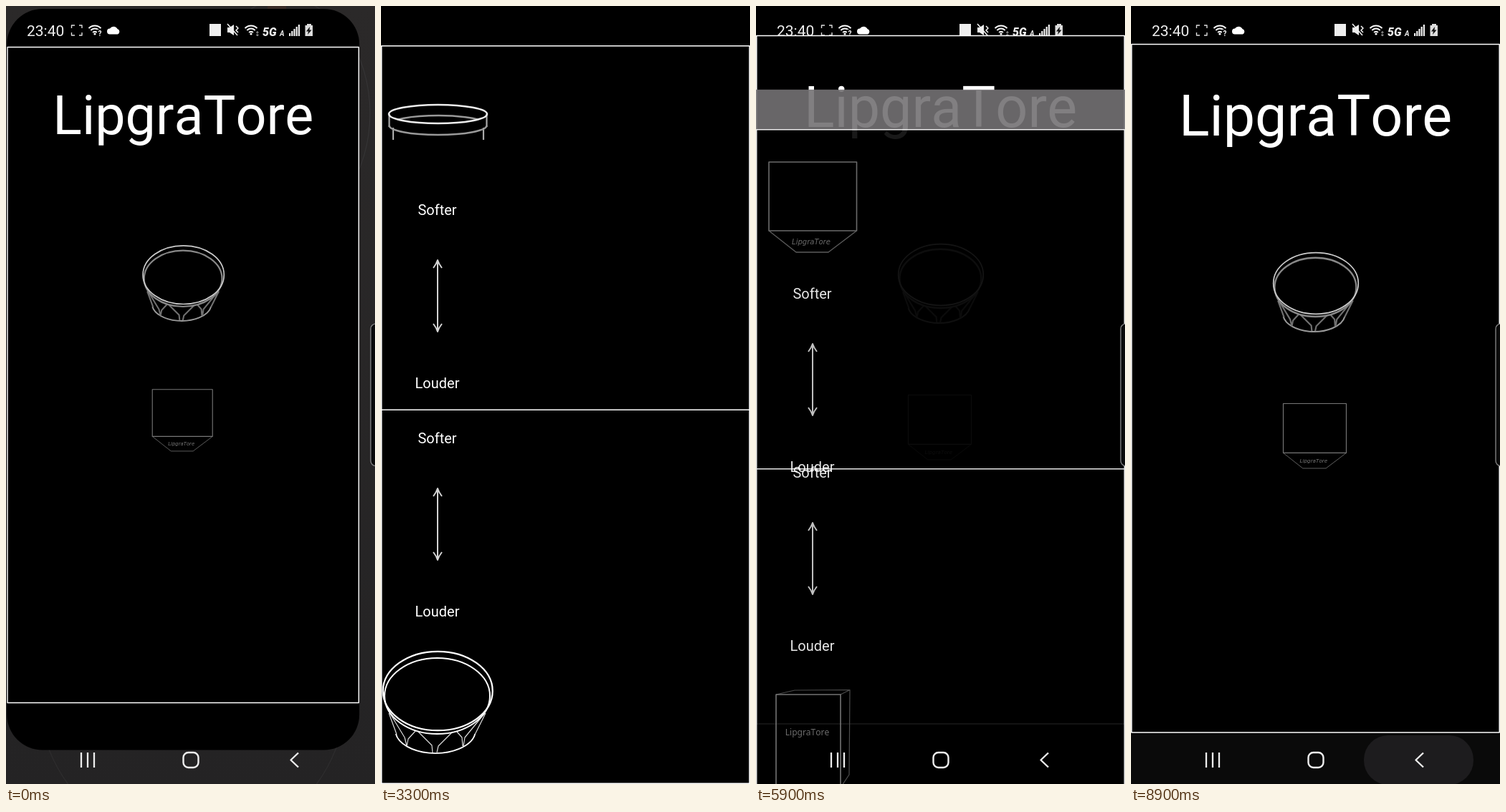
An HTML page with a canvas that plays this animation: 515x1087 px, repeating every 9000 ms.

```html
<!DOCTYPE html>
<html lang="en">
<head>
<meta charset="utf-8">
<title>LipgraTore</title>
<style>
html, body { margin: 0; height: 100%; overflow: hidden; background: #000; }
canvas { display: block; }
</style>
</head>
<body>
<canvas id="stage" width="515" height="1087"></canvas>
<script>
const W = 515, H = 1087, LOOP = 9000, STEP = 100;
const NAME = 'LipgraTore';
const c = document.getElementById('stage').getContext('2d');
c.lineJoin = 'round';
c.fontKerning = 'none';

function stroke(path, color = '#fff', width = 1.5) {
  c.strokeStyle = color;
  c.lineWidth = width;
  c.stroke(new Path2D(path));
}
function fill(path, color = '#fff') {
  c.fillStyle = color;
  c.fill(new Path2D(path));
}
function rect(x, y, w, h, color) {
  c.fillStyle = color;
  c.fillRect(x, y, w, h);
}
function oval(x, y, rx, ry, color, width, from = 0, to = 2) {
  c.beginPath();
  c.ellipse(x, y, rx, ry, 0, from * Math.PI, to * Math.PI);
  c.strokeStyle = color;
  c.lineWidth = width;
  c.stroke();
}
function pill(x, y, w, h, r) {
  c.beginPath();
  c.roundRect(x, y, w, h, r);
}
function text(s, x, y, font, color = '#fff', align = 'center') {
  c.font = font;
  c.textAlign = align;
  c.fillStyle = color;
  c.fillText(s, x, y);
}
// Draws with the point (ax, ay) of the artwork moved to (x, y) and scaled there.
function place(x, y, sx, sy, ax, ay, draw) {
  c.save();
  c.translate(x, y);
  c.scale(sx, sy);
  c.translate(-ax, -ay);
  draw();
  c.restore();
}
const soften = hit => { c.filter = hit ? 'none' : 'blur(0.6px)'; };

// Instruments, in the coordinates of the playing page
function drum(hit) {
  soften(hit);
  const rib = hit ? '#ddd' : '#707070', w = hit ? 1.2 : 2.8;
  oval(76, 1012, 56, 32, hit ? '#fff' : '#999', hit ? 1.8 : 2.6, 0.05, 0.95);
  stroke('M11 988L22 1018M146 988L131 1018M13 989L33 1022L36 1034M48 1013L38 1024L36 1034' +
    'M52 1014L71 1033L72 1043M100 1014L80 1034L78 1043' +
    'M106 1014L113 1022L114 1034M144 989L117 1022L115 1034', rib, w);
  oval(78.5, 964, 73.5, 53, hit ? '#fff' : '#888', hit ? 2 : 3);
  oval(79.25, 957, 76.5, 55.2, hit ? '#fff' : '#ccc', 2.2);
}
function snare(hit) {
  soften(hit);
  const dim = hit ? '#fff' : '#999';
  stroke('M17 170V187M143 170V187M11.5 151V169M147.5 151V169', hit ? '#fff' : '#aaa', 2.2);
  oval(79.5, 167, 68, 13, dim, 2.6, 0, 1);
  oval(79.5, 166, 68, 13, dim, 2.4, 1.19, 1.81);
  oval(79.5, 151, 68.5, 13, hit ? '#fff' : '#eee', 2.6);
}
function cowbell(hit) {
  const color = hit ? '#fff' : '#777';
  stroke('M18 101H140.5V197H18Z', color, 1.6);
  stroke('M18 197L56 227H101L140.5 197', hit ? '#fff' : '#666', 1.3);
  text(NAME, 77, 216, 'italic 10px "DejaVu Sans", sans-serif', color);
}
function box(hit) {
  stroke('M28 914L54 908L131 907.5L130 1026L118 1044M118 914L131 907.5', hit ? '#fff' : '#555', 1.2);
  stroke('M28 914H118V1044H28Z', hit ? '#fff' : '#808080', 1.6);
  text(NAME, 71.5, 971, '12px "Noto Sans", sans-serif', hit ? '#fff' : '#777');
}

function wifi(x) {
  for (const r of [4, 8, 12]) oval(x, 40, r, r * 1.05, '#fff', 2, 1.25, 1.75);
  c.beginPath();
  c.arc(x, 39, 1.6, 0, 7);
  c.fillStyle = '#fff';
  c.fill();
}
function statusBar(camera) {
  text('23:40', 29, 41.5, '21px Roboto, sans-serif', '#eee', 'left');
  stroke('M91.5 31V27H96M102 27H106V31M106 37V41H102M96 41H91.5V37', '#ddd', 1.4);
  if (camera) {
    stroke('M94.5 31.5H100.5V36.5H94.5Z', '#ddd', 1.4);
    fill('M101 34L104.5 31.5V37Z', '#ddd');
  }
  wifi(124);
  rect(127, 33, 8, 9, '#000');
  text('?', 131, 42, 'bold 10px Roboto, sans-serif');
  fill('M145 39.5A4 4 0 0 1 145 31.5A6 6 0 0 1 155.5 32A4 4 0 0 1 156 39.5Z');
  rect(284, 25, 16, 17, '#eee');
  fill('M309 30H312L318 26V41L312 37H309Z', '#eee');
  stroke('M309 25L323 41M321 28L324 31L321 34L324 37', '#eee', 1.6);
  wifi(342);
  text('↕', 351, 42, '9px "DejaVu Sans", sans-serif', '#bbb');
  text('5G', 358, 42, 'italic 900 16px Roboto, sans-serif', '#eee', 'left');
  text('A', 382, 42, 'italic bold 10px Roboto, sans-serif', '#eee', 'left');
  for (let i = 0; i < 5; i++) rect(395 + i * 3.2, 38 - i * 3, 2.2, 4 + i * 3, '#eee');
  rect(420, 25, 6, 3, '#ddd');
  rect(417.5, 27, 10.5, 15, '#ddd');
  fill('M424 29L419 35.5H422L421 40L426.5 33.5H423.5Z', '#111');
}
function navBar(color) {
  stroke('M105 1043V1064M114 1043V1064M123 1043V1064', color, 2.3);
  pill(247.5, 1043, 21, 21, 7);
  c.strokeStyle = color;
  c.lineWidth = 2.4;
  c.stroke();
  stroke('M408 1043.5L397.5 1053.5L408 1063.5', color, 2.4);
}
function edgeHandle() {
  pill(509, 444, 30, 198.5, 7);
  c.fillStyle = '#0a0a0a';
  c.fill();
  c.strokeStyle = '#888';
  c.lineWidth = 1.3;
  c.stroke();
}

function wallpaper() {
  const g = c.createLinearGradient(0, 0, 0, H);
  g.addColorStop(0, '#2b2929');
  g.addColorStop(1, '#242324');
  rect(0, 0, W, H, g);
  rect(365, 0, 26, 5, '#3a2c27');
  oval(390, 150, 118, 160, '#353435', 1.2);
  oval(260, 960, 215, 215, '#2f2e2f', 1.2);
}
function home(dy) {
  c.save();
  c.translate(0, dy);
  rect(0, 53, W, 962, '#000');
  stroke('M.8 53.5H514.2V1015H.8Z');
  text(NAME, 257.5, 181, '79px Roboto, sans-serif');
  place(258, 344, 0.775, 0.776, 79.25, 901, drum);
  place(212.5, 555.5, 0.718, 0.718, 18, 101, cowbell);
  c.restore();
}

function fader(y) {
  const font = '20px Roboto, sans-serif';
  text('Softer', 78.5, y, font);
  text('Louder', 78.5, y + 242, font);
  stroke(`M79 ${y + 63}V${y + 163}` +
    `M73 ${y + 74}Q77 ${y + 69} 79 ${y + 63}Q81 ${y + 69} 85 ${y + 74}` +
    `M73 ${y + 152}Q77 ${y + 157} 79 ${y + 163}Q81 ${y + 157} 85 ${y + 152}`, '#d4d4d4', 2);
}
// k is 1 when the page enters in its short layout and 0 once it fills the screen.
function page(bells, k, dy, alpha, hitTop, hitBottom) {
  const rise = k * (bells ? 117 : 114.5) + dy;
  const top = 55.8 + rise, middle = 564.2 + rise - 34.5 * k, low = rise - 69 * k;
  const bottom = H - 0.7 + rise - 83 * k;
  c.save();
  c.globalAlpha = alpha * (1 - k);
  rect(0, 0, W, top - 56, '#000');
  c.globalAlpha = alpha;
  const gray = Math.round(116 * Math.sqrt(k));
  rect(0, top - 56, W, 56, `rgb(${gray},${gray - 2 * k},${gray})`);
  rect(0, top, W, H, '#000');
  stroke(`M.7 ${top}H514.3V${bottom}H.7ZM0 ${middle}H515`);
  fader(292 + rise);
  fader(611 + low);
  if (bells) {
    const s = hitTop ? 1.08 : 1, b = hitBottom ? 1.06 : 1;
    place(79, 164 + rise, s, s, 79, 164, () => cowbell(hitTop));
    place(79, 976 + low, b, b, 79, 976, () => box(hitBottom));
  } else {
    const s = hitTop ? 1.01 : 1;
    place(79.5, 163 + rise, s, s, 79.5, 163, () => snare(hitTop));
    place(79.25, 972 + low, hitBottom ? 1 : 0.97, hitBottom ? 1 : 0.985, 79.25, 972, () => drum(hitBottom));
  }
  c.restore();
}

// Each visit to a playing page: opening, bars swiped in, back pressed, and hits as [on, off].
const visits = [
  { open: 1100, swipe: 4000, back: 4600, bells: false,
    top: [[2100, 2200], [2300, 2400], [2600, 2800]], bottom: [[3300, 3400], [3600, 3700]] },
  { open: 5900, swipe: 8200, back: 8600, bells: true,
    top: [[7300, 7400], [7600, 7700], [7800, 7900]], bottom: [[6600, 6700], [6800, 7000]] }
];
const clamp = v => Math.max(0, Math.min(1, v));
const within = (t, spans) => spans.some(([on, off]) => t >= on && t < off);

function draw(t) {
  rect(0, 0, W, H, '#000');
  const camera = within(t, [[100, 800], [4000, 5400]]);
  const visit = visits.find(v => t >= v.open && t < v.back + 400);
  const leaving = visit ? t - visit.back : -1;
  const opened = visit ? clamp((t - visit.open) / 400) : 0;
  const k = visit ? (1 - opened) ** 3 : 0;
  const onPage = visit && leaving < 300;
  const swiped = visit ? clamp((t - visit.swipe + 100) / (visit.back - visit.swipe)) : 0;

  if (t < 300) {
    const z = (1 - t / 300) ** 2;
    const shrink = paint => place(1.3 * z, 6.5 * z, 1 - 0.045 * z, 1 - 0.0473 * z, 0, 0, paint);
    wallpaper();
    shrink(() => {
      pill(0, -2.6, W, H, 52 * Math.min(1, 2 * z));
      c.fillStyle = '#000';
      c.fill();
    });
    statusBar(camera);
    shrink(() => home(0));
  } else {
    statusBar(camera);
    home(!onPage ? 0 : leaving >= 0 ? -6 : -12 - 10 * opened);
  }

  if (onPage) {
    const dy = leaving > 0 ? 10.5 * (leaving / 100) ** 1.5 : 0;
    const alpha = leaving >= 200 ? 0.25 : Math.min(1, 0.9 + opened);
    page(visit.bells, k, dy, alpha, within(t, visit.top), within(t, visit.bottom));
  }

  const bars = onPage ? Math.max(k, swiped) : 1;
  if (onPage && swiped > 0) {
    c.save();
    c.translate(0, -50 * (1 - swiped));
    statusBar(camera);
    c.restore();
  }
  c.save();
  c.globalAlpha = bars;
  c.translate(0, 70 * (1 - bars));
  if (leaving >= 0) {
    if (!onPage) rect(0, 1016, W, 71, '#0a0a0a');
    pill(325, 1019, 153, 69, 34);
    c.fillStyle = leaving ? '#1d1c1e' : '#111';
    c.fill();
  }
  navBar(t >= 600 && t < 1500 ? '#b8b8b8' : '#eee');
  c.restore();
  c.globalAlpha = bars;
  if (bars > 0) edgeHandle();
  c.globalAlpha = 1;
}

// The screen advances ten times a second.
function tick() {
  draw(Math.floor((performance.now() % LOOP) / STEP) * STEP);
  requestAnimationFrame(tick);
}
tick();
</script>
</body>
</html>
```
